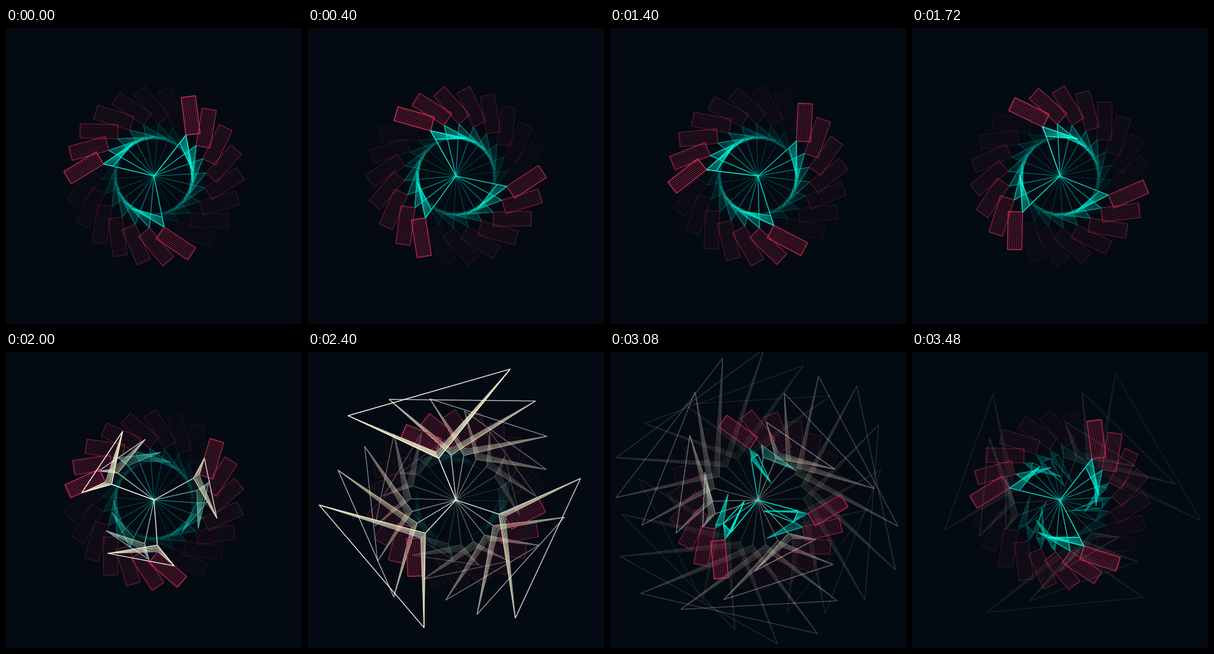
Animation, 500 px wide and 500 px high, one loop 3.52 s. Source, as an HTML page:

```html
<!DOCTYPE html>
<html lang="en">
<head>
<meta charset="utf-8">
<title>Spinning arms</title>
<style>
  html, body { margin: 0; width: 100%; height: 100%; overflow: hidden; background: #030a12; }
  svg { display: block; width: 100vw; height: 100vh; }
  path { fill: none; stroke-linejoin: round; }
</style>
</head>
<body>
<svg id="stage" viewBox="0 0 500 500"></svg>
<script>
const NS = 'http://www.w3.org/2000/svg';
const LOOP = 3520, FRAME = 40, DRAW = 32;
const COPIES = 27, FADE = 0.9;
const START = 308, STEP = 114.393, LAG = 114.58;
const LINES = 8;

// Opening of the triangle, by draw number
const KEYS = [[51, 0], [55, 0.04], [60, 0.23], [66, 0.49], [73, 0.81], [76, 0.935],
  [79, 1], [82, 0.9], [85, 0.675], [88, 0.38], [91, 0.08], [95, -0.23],
  [98, -0.2], [102, -0.07], [105, 0]];

const stage = document.getElementById('stage');

function add(parent, tag, attrs) {
  const el = document.createElementNS(NS, tag);
  for (const k in attrs) el.setAttribute(k, attrs[k]);
  parent.appendChild(el);
  return el;
}

function hatch() {
  let d = '';
  for (let i = 1; i < LINES; i++) d += `M${62 + i * 3} 62V126`;
  return d;
}

function makeArm() {
  const g = add(stage, 'g', {});
  add(g, 'path', { d: hatch(), stroke: '#c8284f', 'stroke-width': 1, opacity: 0.72 });
  add(g, 'path', { d: 'M62 62H86V126H62Z', stroke: '#d32d55', 'stroke-width': 1.5 });
  return {
    g,
    mesh: add(g, 'path', { 'stroke-width': 0.9, opacity: 0.75 }),
    glow: add(g, 'path', { stroke: '#e8d820', 'stroke-width': 1 }),
    edge: add(g, 'path', { 'stroke-width': 1.5 })
  };
}

// Oldest copy first, so the newest lies on top
const arms = Array.from({ length: COPIES }, makeArm).reverse();

function opening(n) {
  if (n <= KEYS[0][0]) return 0;
  for (let i = 1; i < KEYS.length; i++) {
    const [a, va] = KEYS[i - 1], [b, vb] = KEYS[i];
    if (n <= b) return va + (vb - va) * (n - a) / (b - a);
  }
  return 0;
}

function tint(w) {
  const mix = (a, b) => Math.round(a + (b - a) * w);
  return `rgb(${mix(0, 255)},${mix(245, 255)},${mix(220, 245)})`;
}

function poseArm(arm, n, angle, age) {
  const e = opening(n);
  const white = Math.min(1, Math.max(0, e / 0.2));
  const x1 = 66 + 194 * e;
  const y2 = 62 + 185 * Math.sign(e) * Math.pow(Math.abs(e), 1.25);
  const q0 = 50 + 4 * white;
  const bend = q => `M${x1.toFixed(2)} 0L${q.toFixed(2)} ${q.toFixed(2)}L62 ${y2.toFixed(2)}`;

  let mesh = '';
  for (let i = 1; i < LINES; i++) mesh += bend(q0 + (62 - q0) * i / (LINES - 1));

  const colour = tint(white);
  arm.g.setAttribute('transform', `translate(250 250) rotate(${angle + 45}) scale(1 -1)`);
  arm.g.setAttribute('opacity', Math.pow(FADE, age));
  arm.mesh.setAttribute('d', mesh);
  arm.mesh.setAttribute('stroke', colour);
  arm.glow.setAttribute('d', bend(q0 + 3));
  arm.glow.setAttribute('opacity', 0.7 * white);
  arm.edge.setAttribute('d', `M0 0L${q0} ${q0}${bend(q0)}Z`);
  arm.edge.setAttribute('stroke', colour);
}

function render(ms) {
  const t = Math.floor((ms % LOOP) / FRAME) * FRAME;
  const n = Math.floor(t / DRAW + 0.05);
  const head = START + n * STEP;
  arms.forEach((arm, age) => poseArm(arm, n - age, (head - age * LAG) % 360, age));
}

let begin = null;
function tick(now) {
  if (begin === null) begin = now;
  render(now - begin);
  requestAnimationFrame(tick);
}
render(0);
requestAnimationFrame(tick);
</script>
</body>
</html>
```
